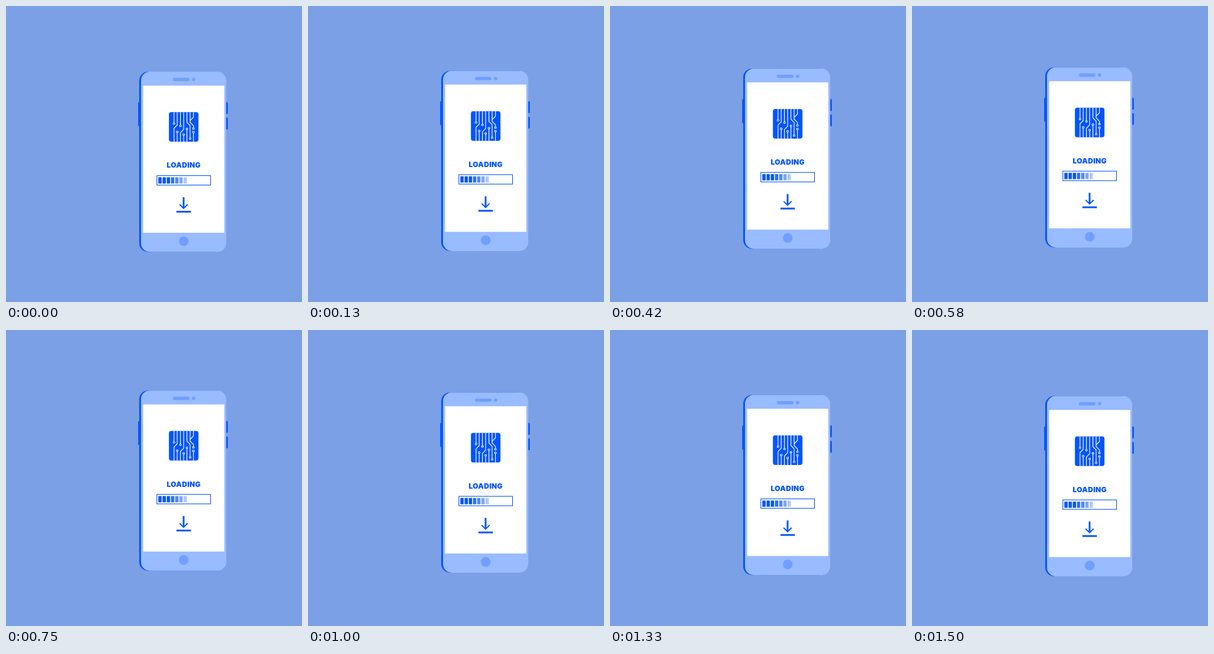
An HTML page with a canvas for the animation above (1.54 s loop, 500 by 500 pixels).

```html
<!DOCTYPE html>
<html lang="en">
<head>
<meta charset="utf-8">
<title>Loading phone</title>
<style>
  html, body { margin: 0; width: 100%; height: 100%; overflow: hidden; background: #7ca0e6; }
  canvas { display: block; width: 500px; height: 500px; }
</style>
</head>
<body>
<canvas id="stage"></canvas>
<script>
const LOOP = 1540, STEP = 1000 / 24, STEPS = 37;
const BLUE = '#0055ff', BODY = '#99bbff', DETAIL = '#6f9fff', PAPER = '#ffffff';
const CELLS = [BLUE, BLUE, BLUE, '#2a70ff', '#5087fc', '#7ea6ff', '#b0caff'];

const canvas = document.getElementById('stage');
const ratio = window.devicePixelRatio || 1;
canvas.width = canvas.height = 500 * ratio;
const ctx = canvas.getContext('2d');

function box(x, y, w, h, radius, color) {
  ctx.fillStyle = color;
  ctx.beginPath();
  ctx.roundRect(x, y, w, h, radius);
  ctx.fill();
}

function disc(x, y, r, color) {
  ctx.fillStyle = color;
  ctx.beginPath();
  ctx.arc(x, y, r, 0, Math.PI * 2);
  ctx.fill();
}

function line(color, width, ...points) {
  ctx.strokeStyle = color;
  ctx.lineWidth = width;
  ctx.beginPath();
  points.forEach(([x, y]) => ctx.lineTo(x, y));
  ctx.stroke();
}

function node(x, y) {
  disc(x, y, 2, PAPER);
  disc(x, y, 0.95, BLUE);
}

function drawBody() {
  box(223.2, 162.5, 5, 40.5, 1.5, BLUE);
  box(369, 162.5, 5.7, 20, 1.5, BLUE);
  box(369, 188.5, 5.7, 20, 1.5, BLUE);
  box(225, 111, 144, 304.5, 15, BLUE);
  box(228, 111, 144, 304.5, 15, BODY);
  box(231.5, 134.4, 137.3, 248.6, 0, PAPER);
  box(282, 121.3, 28, 5.6, 2.8, DETAIL);
  disc(316.9, 124.1, 2.8, DETAIL);
  disc(300.2, 397.3, 8.2, DETAIL);
}

function drawChip() {
  const top = 179.3, bottom = 229.3;
  const trace = (...points) => line(PAPER, 1.2, ...points);
  box(275.2, top, 49.9, 50, 4, BLUE);
  trace([283.8, top], [283.8, 197]);
  trace([289.2, top], [289.2, 201], [283.8, 206.5], [283.8, bottom]);
  trace([294.6, top], [294.6, 201]);
  trace([300.1, top], [300.1, 208.5], [294.6, 214], [294.6, bottom]);
  trace([305.6, top], [305.6, 196.5], [311, 202], [311, 223]);
  trace([311, top], [311, 196.5], [316.6, 202], [316.6, 206]);
  trace([316.6, top], [316.6, 188], [311, 193.5]);
  for (const [x, y] of [[289.2, 212.5], [300.1, 217.2], [305.6, 207.8], [316.6, 213]]) {
    trace([x, y], [x, bottom]);
    node(x, y);
  }
  for (const [x, y] of [[283.8, 198.4], [294.6, 202.4], [311, 224], [316.6, 207.1]]) node(x, y);
}

function drawProgress() {
  ctx.fillStyle = BLUE;
  ctx.font = '900 12px Inter, "Open Sans", sans-serif';
  ctx.textAlign = 'center';
  ctx.letterSpacing = '0.3px';
  ctx.fillText('LOADING', 300.2, 273.4);
  ctx.strokeStyle = BLUE;
  ctx.lineWidth = 1.1;
  ctx.strokeRect(254.8, 286.5, 90.7, 16);
  CELLS.forEach((color, i) => box(257.3 + 7.1 * i, 289.3, 5.6, 10.6, 0, color));
}

function drawArrow() {
  line(BLUE, 3, [300, 323], [300, 341]);
  line(BLUE, 2, [293.3, 335.2], [300, 341.9], [306.7, 335.2]);
  box(287.9, 346, 24.4, 3, 0, BLUE);
}

// Constant-speed bob, sampled at 24 steps per second.
function bob(time) {
  const step = Math.floor((time % LOOP + 4.9) / STEP);
  const phase = (step - 17.2 + STEPS) % STEPS;
  return -9.2 + 0.535 * Math.min(phase, STEPS - phase);
}

function draw(time) {
  ctx.setTransform(ratio, 0, 0, ratio, 0, 0);
  ctx.fillStyle = '#7ca0e6';
  ctx.fillRect(0, 0, 500, 500);
  ctx.translate(0, bob(time));
  drawBody();
  drawChip();
  drawProgress();
  drawArrow();
}

let start;
function tick(now) {
  start ??= now;
  draw(now - start);
  requestAnimationFrame(tick);
}
draw(0);
requestAnimationFrame(tick);
</script>
</body>
</html>
```
